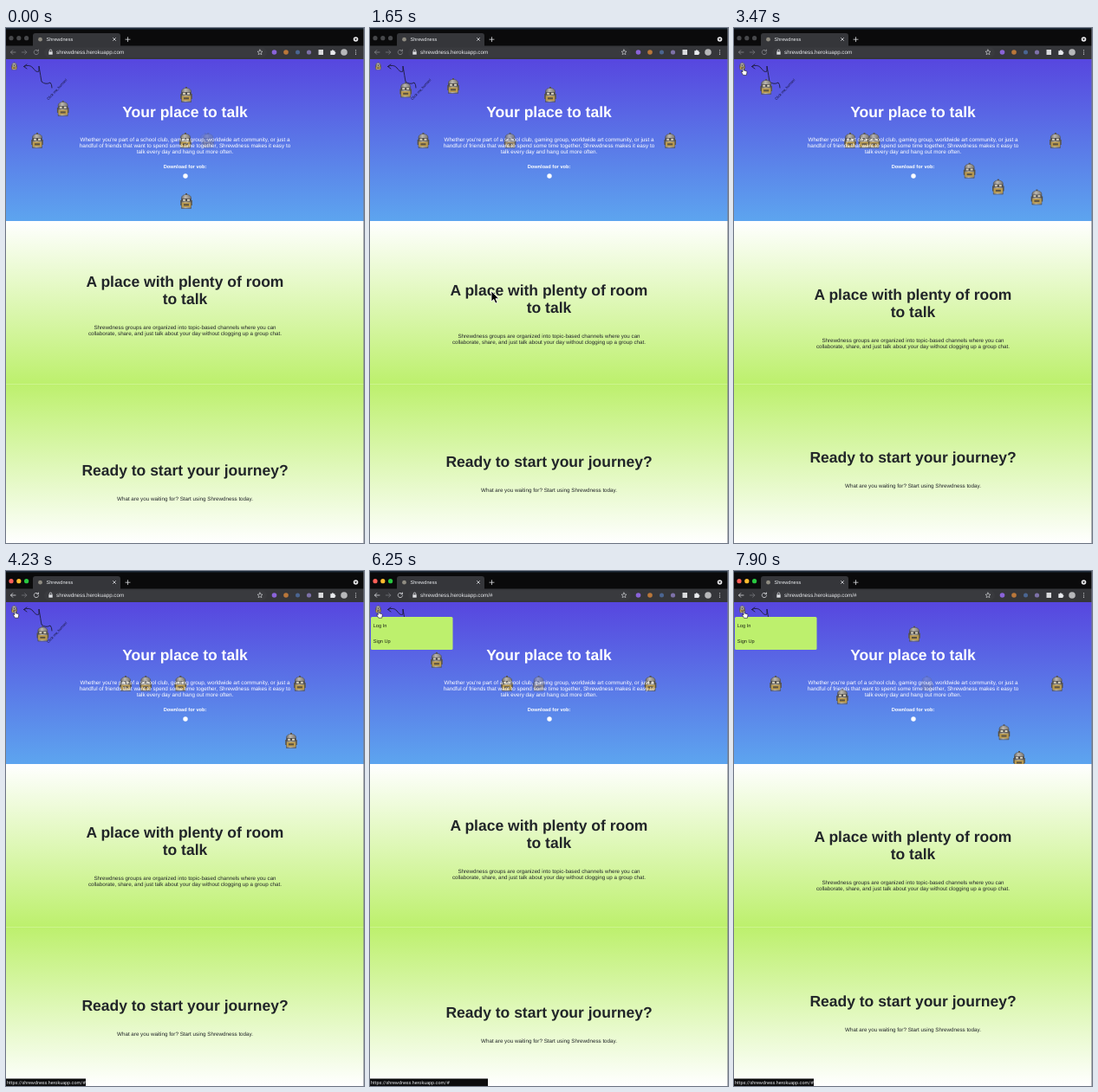
Animation of 413 by 595 pixels, one loop 8 s. Source, as an HTML page:

```html
<!DOCTYPE html>
<html lang="en">
<head>
<meta charset="utf-8">
<title>Shrewdness</title>
<style>
  html, body { margin: 0; width: 100%; height: 100%; overflow: hidden; background: #fff; }
  svg { display: block; width: 413px; height: 595px; }
  text { font-family: "Liberation Sans", Arial, sans-serif; text-rendering: geometricPrecision; }
  .mid { text-anchor: middle; }
  .big { font-size: 17.5px; font-weight: bold; }
  .p { font-size: 6.25px; }
  .ui { font-family: Roboto, sans-serif; }
  .dark { fill: #212529; }
  .line { fill: none; stroke-linecap: round; stroke-linejoin: round; }
</style>
</head>
<body>
<svg viewBox="0 0 413 595">
  <defs>
    <linearGradient id="sky" x2="0" y2="1"><stop stop-color="#5746df"/><stop offset="1" stop-color="#5da5ef"/></linearGradient>
    <linearGradient id="down" x2="0" y2="1"><stop stop-color="#fff"/><stop offset="1" stop-color="#bdf06d"/></linearGradient>
    <linearGradient id="up" x2="0" y2="1"><stop stop-color="#bdf06d"/><stop offset="1" stop-color="#fff"/></linearGradient>
    <linearGradient id="steel"><stop stop-color="#6d6b6c"/><stop offset=".4" stop-color="#bcb8b0"/><stop offset="1" stop-color="#77736e"/></linearGradient>
    <clipPath id="hero"><path d="M0 36h413v187H0z"/></clipPath>
    <g id="bot">
      <path d="M-1-9h2v2h-2z" fill="#55524f"/>
      <path d="M-6.800-1h1.600v6h-1.600zM5.200-1h1.600v6H5.200z" fill="#5c5648"/>
      <path d="M-5.500 8.500V-4Q-5-7.500 0-7.500T5.500-4V8.500z" fill="url(#steel)" stroke="#45423f" stroke-width=".5"/>
      <path d="M-5.300-3h10.600v3.400h-10.600z" fill="#4c4a4b"/>
      <path d="M-4-2.300h3v2h-3zM1-2.300h3v2H1z" fill="#d9d3bd"/>
      <path d="M-5.200 1.500h10.400v5.500h-10.400z" fill="#b99a4e"/>
      <path d="M-3 3.300h6v2h-6z" fill="#5a5142"/>
    </g>
  </defs>

  <path fill="url(#sky)" d="M0 36h413v187H0z"/>
  <path fill="url(#down)" d="M0 223h413v188H0z"/>
  <path fill="url(#up)" d="M0 411h413v184H0z"/>
  <path fill="#fff" opacity=".3" d="M0 411h413v.8H0z"/>

  <path class="line" stroke="#1c1b3a" stroke-width=".9" d="M24 42L20.500 44.500L24 47M20.500 44.500Q27 41.500 31 46Q35 52 38 50L38 44Q40 56 41 62Q46 66 51 63Q53 65 53 69"/>
  <text class="ui" transform="translate(49 83.500) rotate(-47)" font-size="4.200" fill="#17163a">Click me, human!</text>

  <g clip-path="url(#hero)" id="bots"></g>
  <use href="#bot" transform="translate(9.500 44) scale(.5)"/>

  <g class="mid" fill="#fff">
    <text class="big" x="206.500" y="102.500">Your place to talk</text>
    <g font-size="6.340">
      <text x="206.500" y="130.600">Whether you're part of a school club, gaming group, worldwide art community, or just a</text>
      <text x="206.500" y="137.700">handful of friends that want to spend some time together, Shrewdness makes it easy to</text>
      <text x="206.500" y="144.800">talk every day and hang out more often.</text>
    </g>
    <text x="206.500" y="162" font-size="5.670" font-weight="bold">Download for vob:</text>
    <circle cx="207" cy="171" r="2.700"/>
  </g>

  <g id="room" class="mid dark">
    <text class="big" x="206.500" y="299.400">A place with plenty of room</text>
    <text class="big" x="206.500" y="319.400">to talk</text>
    <text class="p" x="206.500" y="348">Shrewdness groups are organized into topic-based channels where you can</text>
    <text class="p" x="206.500" y="355">collaborate, share, and just talk about your day without clogging up a group chat.</text>
  </g>
  <g id="ready" class="mid dark">
    <text class="big" x="206.500" y="516.800">Ready to start your journey?</text>
    <text class="p" x="206.500" y="545.600">What are you waiting for? Start using Shrewdness today.</text>
  </g>

  <g id="menu">
    <rect x="1" y="53" width="94.500" height="38" rx="1.500" fill="#bdf06d"/>
    <path id="hover" d="M1 53h94.500v19H1z" fill="#fff"/>
    <g font-size="5.650" fill="#1d2416">
      <text x="3.700" y="64.600">Log In</text>
      <text x="3.700" y="83.400">Sign Up</text>
    </g>
  </g>

  <!-- browser frame -->
  <path d="M0 0h413v36H0z" fill="#0a0a0b"/>
  <path d="M0 0h413v1.500H0z" fill="#1d2a38"/>
  <path d="M0 20.500h413V36H0zM31 20.500V9q0-3 3-3h95q3 0 3 3v11.500z" fill="#35363a"/>
  <rect x="44" y="22.300" width="257" height="11.800" rx="5.900" fill="#393a3e"/>
  <g id="lights"><circle cx="6" cy="11.700" r="2.600"/><circle cx="14.800" cy="11.700" r="2.600"/><circle cx="23.600" cy="11.700" r="2.600"/></g>
  <circle cx="39.500" cy="13.200" r="2.400" fill="#8f8c82"/>
  <g class="ui" fill="#e8eaed">
    <text x="46.500" y="15.200" font-size="5.600">Shrewdness</text>
    <text id="url" x="58" y="30.300" font-size="6.250"></text>
  </g>
  <g class="line" stroke="#dcdee1" stroke-width=".8">
    <path d="M123.500 11.500l3 3m0-3l-3 3M138 13.200h5m-2.500-2.500v5"/>
    <g id="nav"><path d="M11 28H5.500m2.200-2.300L5.500 28l2.200 2.300"/><path d="M37 26.200a2.700 2.700 0 1 0 .6 2.400M37.500 25v1.800h-1.800"/></g>
    <path stroke="#75777b" d="M18.300 28h5.500m-2.200-2.300l2.200 2.300l-2.200 2.300"/>
    <path d="M50.200 27.500v-1.200a1.300 1.300 0 0 1 2.600 0v1.200"/>
    <path stroke-width=".6" d="M293 25l.9 2 2.100.2-1.600 1.400.5 2.100-1.900-1.100-1.900 1.100.5-2.100-1.600-1.400 2.100-.2z"/>
  </g>
  <path d="M49.300 27.400h4.400v3.300h-4.400z" fill="#dcdee1"/>
  <circle cx="403.500" cy="13" r="2.800" fill="#e4e4e6"/>
  <path d="M402 12.300h3l-1.500 1.900z" fill="#111"/>
  <circle cx="309.500" cy="28" r="2.800" fill="#8a63d8"/>
  <circle cx="323" cy="28" r="2.800" fill="#b9773a"/>
  <circle cx="336.500" cy="28" r="2.500" fill="#4a6590"/>
  <circle cx="349.500" cy="28" r="2.600" fill="#7d71a8"/>
  <path d="M360.500 25h5.500v6h-5.500z" fill="#d9dadc"/>
  <path d="M374.300 26.300h1.600a1 1 0 1 1 2 0h1.500v1.500a1 1 0 1 1 0 2v1.200h-5.100z" fill="#e8eaed"/>
  <circle cx="390" cy="28" r="3.800" fill="#b7b8ba"/>
  <g fill="#e0e1e3"><circle cx="403.500" cy="25.800" r=".6"/><circle cx="403.500" cy="28" r=".6"/><circle cx="403.500" cy="30.200" r=".6"/></g>
  <path d="M412.400 0h.6v595h-.6z" fill="#777c86"/>

  <g id="status">
    <path id="bubble" fill="#0c0c0d"/>
    <text class="ui" x="1" y="592.500" font-size="5.400" fill="#e8eaed">https://shrewdness.herokuapp.com/#</text>
  </g>

  <g id="cursor">
    <path id="arrow" d="M0 0V12l2.800-2.500 2 4.600 2.200-.9-2-4.500H8.700z" fill="#000" stroke="#fff" stroke-width=".8"/>
    <path id="hand" d="M0 0q1-.8 1.400.3V3l2.800.7q1 .4.7 1.700l-.5 3H.6L-1.500 5q-.3-1 .6-.7l.9.7z" fill="#fff" stroke="#111" stroke-width=".6"/>
    <path id="beam" class="line" d="M-1.500-4Q0-4 0-3Q0-4 1.500-4M0-3V3M-1.500 4Q0 4 0 3Q0 4 1.500 4" stroke="#111" stroke-width=".8"/>
  </g>
</svg>
<script>
const LOOP = 8000, STEP = 95.4, HALF = 2870;
const $ = id => document.getElementById(id);
const lerp = (a, b, u) => a + (b - a) * u;
const clamp = u => Math.min(1, Math.max(0, u));

// CSS ease-in-out, solved for its curve parameter
function ease(x) {
  let s = x;
  for (let i = 0; i < 5; i++)
    s -= (1.26 * s - .78 * s * s + .52 * s ** 3 - x) / (1.26 - 1.56 * s + 1.56 * s * s);
  return s * s * (3 - 2 * s);
}

// There and back, like animation-direction: alternate
function swing(t, half) {
  const u = Math.abs(t / half) % 2;
  return ease(u > 1 ? 2 - u : u);
}

// Swing from a to b, leaving a at the given start; may fade on the way
const glide = (a, b, halves, start = 0, fade = 0) => t => {
  const u = swing(t - start, HALF * halves);
  return [lerp(a[0], b[0], u), lerp(a[1], b[1], u), fade ? Math.max(0, 1 - fade * u) : 1];
};

// Ease through a few [time, x, y] points
const path = (...keys) => t => {
  let i = 0;
  while (i < keys.length - 2 && t >= keys[i + 1][0]) i++;
  const [a, b] = [keys[i], keys[i + 1]];
  const u = ease(clamp((t - a[0]) / (b[0] - a[0])));
  return [lerp(a[1], b[1], u), lerp(a[2], b[2], u), 1];
};

const bots = [
  glide([36, 130], [378, 130], 3),
  glide([36, 130], [378, 130], 2, -HALF),
  glide([36, 67], [266, 269], 4, HALF),
  glide([134, 130], [424, 130], 3, 3500, 2.1),
  glide([158, 130], [253, 130], 1, 3850, 1.15),
  path([0, 208, 200], [700, 208, 240]),
  path([1650, 208, 77], [2550, 208, 240], [4300, 208, 240], [6600, 208, -10], [7900, 208, 73]),
  path([0, 400, 236], [1650, 96, 67], [2600, 106, 73], [4200, 400, 236]),
  path([1650, 400, 236], [2600, 182, 116], [4200, 400, 236], [6900, 400, 236], [7900, 311, 186]),
  path([1650, 400, 240], [2600, 374, 195], [4230, 329, 196], [5400, 329, 240], [6900, 329, 240], [7900, 329, 217])
];

const pointer = path([1100, 220, 390], [1650, 140, 304], [2600, 40, 92], [3400, 10, 46],
  [6150, 9, 45], [6600, 14, 60], [7100, 14, 60], [7550, 11, 46]);

const sprites = bots.map(() => {
  const el = document.createElementNS("http://www.w3.org/2000/svg", "use");
  el.setAttribute("href", "#bot");
  return $("bots").appendChild(el);
});

const show = (id, on) => $(id).style.display = on ? "" : "none";
const move = (el, x, y) => el.setAttribute("transform", `translate(${x.toFixed(2)} ${y.toFixed(2)})`);

function draw(t) {
  bots.forEach((bot, i) => {
    const [x, y, opacity] = bot(t);
    move(sprites[i], x, y);
    sprites[i].setAttribute("opacity", opacity);
  });

  const d = 16 * swing(t, HALF);
  move($("room"), 0, d);
  move($("ready"), 0, -d);

  const active = t >= 3900, clicked = t >= 4900;
  const beam = t >= 6450 && t < 7300, hand = t >= 3250 && !beam;
  const lights = active ? ["#ff5f57", "#febc2e", "#28c840"] : Array(3).fill("#47484b");
  [...$("lights").children].forEach((c, i) => c.setAttribute("fill", lights[i]));
  $("nav").setAttribute("opacity", active ? 1 : .5);
  $("url").textContent = "shrewdness.herokuapp.com" + (clicked ? "/#" : "");

  show("menu", clicked);
  show("hover", beam);
  show("status", active && !(t >= 6600 && t < 7500));
  $("bubble").setAttribute("d", `M0 586.500h${t >= 5000 && t < 6600 ? 136 : 92}v8.500H0z`);

  const [x, y] = pointer(t);
  move($("cursor"), x, y);
  show("cursor", t >= 1100);
  show("arrow", !hand && !beam);
  show("hand", hand);
  show("beam", beam);
}

// The picture holds for one step at a time
function tick() {
  const t = performance.now() % LOOP;
  draw(t < 120 ? 0 : 120 + Math.floor((t - 120) / STEP) * STEP);
  requestAnimationFrame(tick);
}
tick();
</script>
</body>
</html>
```
